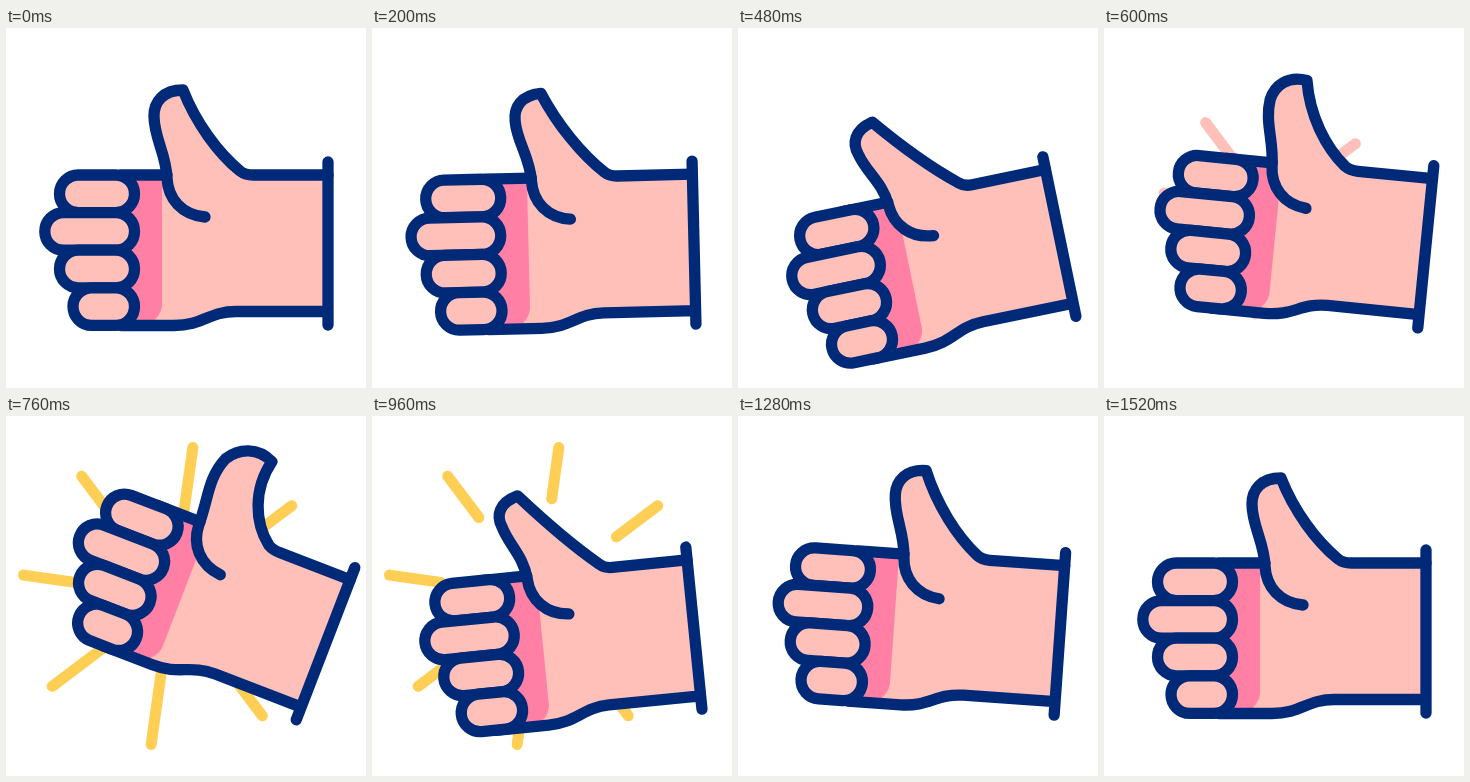
An HTML page that plays this animation: 360x360 px, repeating every 2000 ms.

```html
<!DOCTYPE html>
<html lang="en">
<head>
<meta charset="utf-8">
<title>Thumbs up</title>
<style>
  html, body { margin: 0; width: 100%; height: 100%; overflow: hidden; background: #fff; }
  svg { display: block; width: 100vw; height: 100vh; }
  .line { stroke: #002a78; stroke-width: 11.3; stroke-linecap: round; stroke-linejoin: round; }
  .skin { fill: #ffc0ba; }
  #rays { stroke-width: 11; stroke-linecap: round; }
</style>
</head>
<body>
<svg viewBox="0 0 360 360">
  <path id="rays" fill="none"/>
  <g id="hand">
    <path class="skin" d="M115 147H322V283.5H230C203 283.5 197 297.5 168 297.5H115Z"/>
    <path id="shade" fill="#ff80a4" d="M110 147H156V278Q155 288 143 297H110Z"/>
    <path id="thumb" class="skin line"/>
    <path class="line" fill="none" d="M115 147H161M322 283.5H230C203 283.5 197 297.5 168 297.5H115M322 134V297"/>
    <g id="fingers" class="skin line"></g>
  </g>
</svg>
<script>
const LOOP = 2000, STEP = 40, GRIP = 15, RAY = 150;
const $ = id => document.getElementById(id);
const rad = degrees => degrees * Math.PI / 180;
const clamp = x => Math.min(1, Math.max(0, x));
const ramp = (t, from, to) => (1 - Math.cos(Math.PI * clamp((t - from) / (to - from)))) / 2;

// Each swing eases from the previous value to its own between two times
const swing = (t, ...moves) => moves.reduce(
  (value, [from, to, goal]) => value + (goal - value) * ramp(t, from, to), 0);

const handAngle = t => swing(t, [120, 480, -11.7], [480, 720, 23], [720, 960, -5.7], [960, 1160, 5.4], [1160, 1520, 0]);
const thumbAngle = t => swing(t, [40, 480, -13], [480, 700, 25], [760, 960, -15], [960, 1240, 0]);

// Bends a point around the thumb's root, more strongly towards the tip
function bend(x, y, angle) {
  const a = rad(angle) * clamp((147 - y) / 85), dx = x - 185, dy = y - 130;
  return [185 + dx * Math.cos(a) - dy * Math.sin(a), 130 + dx * Math.sin(a) + dy * Math.cos(a)];
}

function thumbPath(angle) {
  const p = (x, y) => bend(x, y, angle).join(' ') + ' ';
  return 'M199 189C176 187 162 171 161 150C' +
    p(160, 125) + p(148, 110) + p(148, 88) +
    p(148, 74) + p(157, 62) + p(177, 62) +
    p(190, 95) + p(212, 125) + p(234, 143) + 'Q239 147 247 147H322';
}

function rayPath(inner, outer) {
  let d = '';
  for (let i = 0; i < 7; i++) {
    const a = rad(53 + 45 * i);
    const at = r => `${166 + r * Math.cos(a)} ${180 + r * Math.sin(a)}`;
    d += `M${at(inner)}L${at(outer + 0.01)}`;
  }
  return d;
}

const fingerLeft = [53.5, 38.8, 53.5, 67];
const fingers = fingerLeft.map((left, i) => {
  const rect = document.createElementNS('http://www.w3.org/2000/svg', 'rect');
  const size = { y: 147 + 37.6 * i, width: 128.5 - left, height: 37.6, rx: 18.8 };
  for (const key in size) rect.setAttribute(key, size[key]);
  return $('fingers').appendChild(rect);
});

// Fingers close and open one after another
const gripAt = (t, i) =>
  swing(t, [115 + 35 * i, 555 + 35 * i, GRIP], [900 + 18 * i, 1170 + 18 * i, 0]);

function draw(t) {
  $('hand').setAttribute('transform', `rotate(${handAngle(t)} 288 215)`);
  $('thumb').setAttribute('d', thumbPath(thumbAngle(t)));
  $('shade').setAttribute('transform', `translate(${gripAt(t, 1)})`);
  fingers.forEach((rect, i) => rect.setAttribute('x', fingerLeft[i] + gripAt(t, i)));

  const shining = t >= 480 && t < 1160;
  $('rays').setAttribute('d', shining ? rayPath(RAY * ramp(t, 720, 1120), RAY * ramp(t, 440, 690)) : '');
  $('rays').setAttribute('stroke', t < 640 ? '#ffc0ba' : '#ffce54');
}

const start = performance.now();
function tick() {
  const t = (performance.now() - start) % LOOP;
  draw(Math.floor(t / STEP) * STEP);
  requestAnimationFrame(tick);
}
tick();
</script>
</body>
</html>
```
